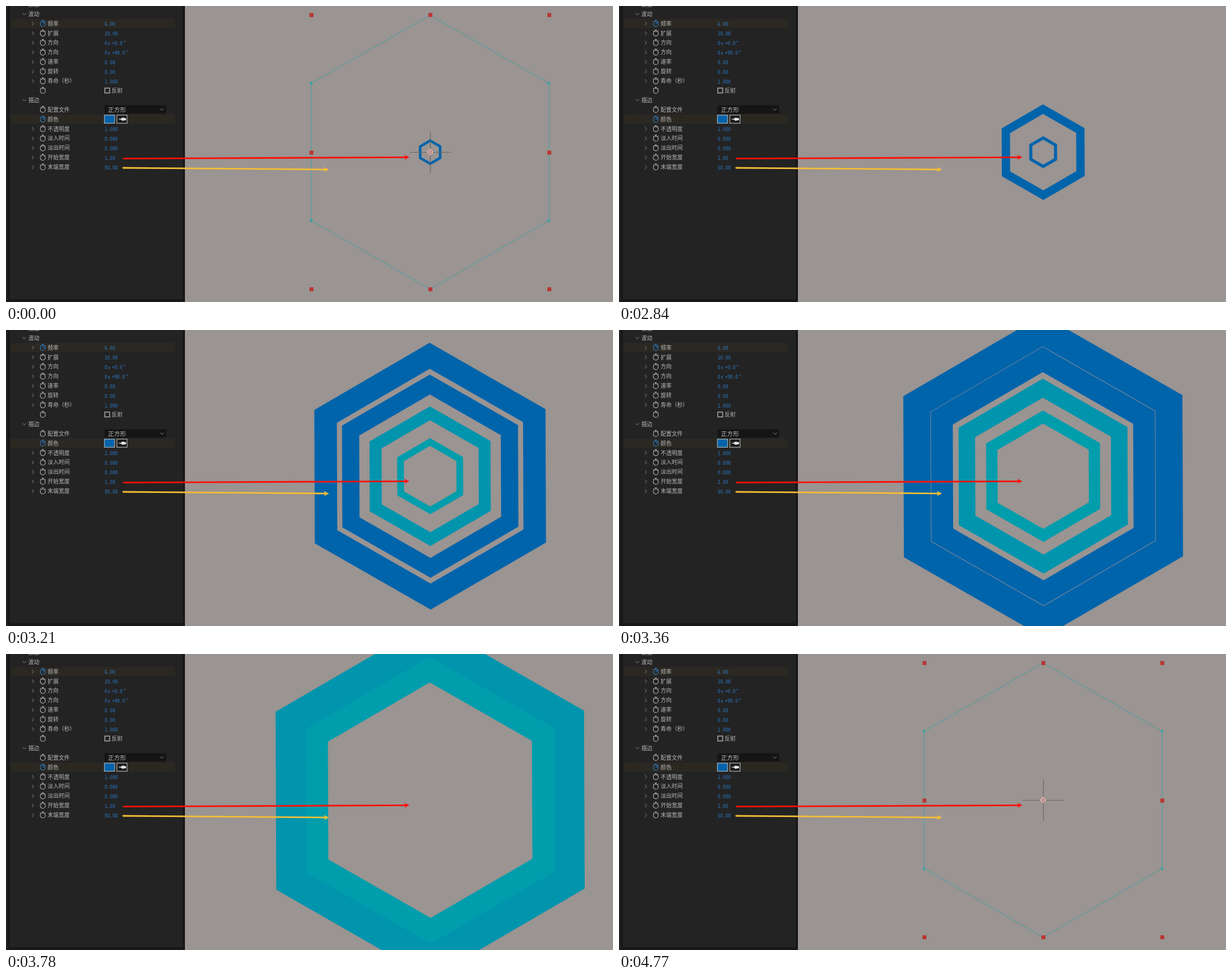
Write an HTML page that moves like this. It is 1072 by 523 pixels and loops after 5510 ms.

```html
<!DOCTYPE html>
<html lang="zh-CN">
<head>
<meta charset="utf-8">
<title>波动描边宽度</title>
<style>
  html, body { margin: 0; width: 100%; height: 100%; overflow: hidden; background: #9a9492; }
  svg { display: block; width: 1072px; height: 523px; }
  text { font-family: "Noto Sans CJK SC", "Noto Sans CJK", sans-serif; font-size: 9.7px; fill: #b9b9b9; }
  .val { font-family: "Noto Sans Mono CJK SC", "Liberation Mono", monospace; font-size: 9.3px; fill: #2c79c4; }
  .small { font-size: 8px; }
  .menu { font-size: 10.7px; }
  .line { fill: none; stroke: #b4b4b4; stroke-width: 1.1; }
  .arrow { fill: none; stroke: #8c8c8c; stroke-width: 1; }
  .keyed { stroke: #2c7fd0; }
</style>
</head>
<body>
<svg viewBox="0 0 1072 523">
  <defs>
    <g id="watch">
      <circle cy=".8" r="4.5"/>
      <path d="M-1.8-5.6H1.8M0-5.6V-3.7M-4.6-4.1l1.3 1.2M4.6-4.1l-1.3 1.2"/>
    </g>
    <path id="closed" class="arrow" d="M-1.5-3.2L1.7 0L-1.5 3.2"/>
    <path id="open" class="arrow" d="M-3.2-1.5L0 1.7L3.2-1.5"/>
  </defs>

  <rect width="1072" height="523" fill="#9a9492"/>
  <g id="waves" fill-rule="evenodd"></g>

  <g id="overlay">
    <path d="M749 16L959 136.5V379L749 500.5L539 379V136.5Z" fill="none" stroke="#3ea1a2"/>
    <g id="handles"></g>
    <path d="M713 258.5H744M754 258.5H786M749.5 222V253M749.5 263V295" stroke="#6c6664" stroke-width="1.2"/>
    <circle cx="748.8" cy="258" r="4.3" fill="none" stroke="#e3c4c2" stroke-width="1.6"/>
    <path d="M744.3 253.5l9 9M753.3 253.5l-9 9" stroke="#c2524f"/>
    <circle cx="748.8" cy="258" r="2" fill="#d9a5a2"/>
  </g>

  <rect width="316" height="523" fill="#181818"/>
  <rect width="3" height="523" fill="#212121"/>
  <rect x="7" width="305" height="518" fill="#232323"/>
  <rect x="8" y="23" width="290" height="16" fill="#2b2822"/>
  <rect x="8" y="192" width="290" height="16" fill="#2b2822"/>
  <g id="rows"></g>

  <rect x="174.5" y="145" width="8.6" height="8.6" class="line" style="stroke-width:1.4"/>
  <text x="186.6" y="153">反射</text>

  <rect x="174" y="175.5" width="109" height="14.5" fill="#151515"/>
  <text class="menu" x="180" y="187">正方形</text>
  <use href="#open" x="275.5" y="182.8"/>

  <rect x="173.8" y="192.8" width="18" height="14.4" fill="#0063ab" stroke="#b0b0b0" stroke-width="1.2"/>
  <rect x="195.8" y="192.8" width="18" height="14.4" fill="#1b1b1b" stroke="#b0b0b0" stroke-width="1.2"/>
  <path d="M197.5 200L205 198.6V201.4Z" fill="#cfcfcf"/>
  <path d="M204 197.6h4l4 1v2.8l-4 1h-4z" fill="#e6e6e6"/>

  <path d="M208 269.5L706 267.4" stroke="#fb1109" stroke-width="2.8" stroke-linecap="round"/>
  <path d="M712.5 267.3L703.5 263L705.5 267.4L703.5 271.6Z" fill="#fb1109"/>
  <path d="M207 286L564 288.9" stroke="#f6be35" stroke-width="2.8" stroke-linecap="round"/>
  <path d="M570.5 288.9L561.5 284.6L563.5 288.9L561.5 293.2Z" fill="#f6be35"/>
</svg>

<script>
const LOOP = 5510;
const byId = id => document.getElementById(id);

// Panel rows: label, value, and "k" when keyed.
const ROWS = [
  ['波动'], ['频率', '6.00', 'k'], ['扩展', '10.00'], ['方向', '0x+0.0'], ['方向', '0x+90.0'],
  ['速率', '0.00'], ['旋转', '0.00'], ['寿命（秒）', '1.000'], ['', ''], ['描边'],
  ['配置文件', ''], ['颜色', '', 'k'], ['不透明度', '1.000'], ['淡入时间', '0.000'],
  ['淡出时间', '0.000'], ['开始宽度', '1.00'], ['末端宽度', '50.00']
];

function valueText(value, y) {
  const [turns, angle] = value.split('x');
  const put = (x, s, cls = '') => `<text class="val ${cls}" x="${x}" y="${y}">${s}</text>`;
  if (!angle) return put(174.2, value);
  const end = 187 + angle.length * 4.65;
  return put(174.2, turns) + put(180, 'x', 'small') + put(187, angle) +
    `<circle cx="${end + 3.5}" cy="${y - 6}" r="1" fill="none" stroke="#2c79c4" stroke-width=".7"/>`;
}

function rowMarkup([label, value, keyed], i) {
  const y = 14 + 16.9 * i;
  if (value === undefined) {
    return `<use href="#open" x="32.3" y="${y}"/><text x="39.6" y="${y + 3.7}">${label}</text>`;
  }
  const lead = value ? `<use href="#closed" x="47.3" y="${y + .3}"/>`
                     : `<circle cx="47" cy="${y}" r=".6" fill="#3c3c3c"/>`;
  const hand = keyed ? `<path class="line keyed" d="M65 ${y + 1}l2.4-2.6"/>` : '';
  return lead +
    `<use href="#watch" class="line ${keyed ? 'keyed' : ''}" x="65" y="${y}"/>` + hand +
    `<text x="73.6" y="${y + 3.7}">${label}</text>` + (value ? valueText(value, y + 4.2) : '');
}

byId('rows').innerHTML =
  '<use href="#open" x="32.3" y="-3"/><text x="39.6" y=".7">蒙版</text>' + ROWS.map(rowMarkup).join('');

const square = (x, y) => `<rect x="${x - 3.5}" y="${y - 3.5}" width="7" height="7" fill="#b93634"/>`;
const dot = (x, y) => `<circle cx="${x}" cy="${y}" r="2.5" fill="#3ea1a2"/>`;
let handles = '';
for (const x of [539.5, 749.5, 959.5])
  for (const y of [16, 259, 500.5])
    if (x !== 749.5 || y !== 259) handles += square(x, y);
for (const x of [538.8, 958.8])
  for (const y of [136.5, 379]) handles += dot(x, y);
byId('handles').innerHTML = handles;

// Waves are born 1/6 s apart and live 1 s; older ones lie on top.
const COLORS = ['#0064ab', '#0064ab', '#0094ad', '#009dac'];
const TILT = -0.22 * Math.PI / 180;
const rings = COLORS.map(fill => {
  const path = document.createElementNS('http://www.w3.org/2000/svg', 'path');
  path.setAttribute('fill', fill);
  byId('waves').prepend(path);
  return path;
});

function hexagon(r) {
  const points = [];
  for (let i = 0; i < 6; i++) {
    const a = i * Math.PI / 3 - Math.PI / 2 + TILT;
    points.push((749.1 + r * Math.cos(a)).toFixed(2) + ' ' + (258.3 + r * Math.sin(a)).toFixed(2));
  }
  return 'M' + points.join('L') + 'Z';
}

function ring(age) {
  if (age <= 0 || age >= 1) return '';
  const outer = 0.5 + 337 * age;
  const inner = Math.max(0, 0.809 * outer - 0.9);
  return hexagon(outer) + hexagon(inner);
}

// Playback: time in ms, age of the first wave in s, steps until the next entry.
const PLAY = [
  [0, 0.0667, 1], [2710, 0.15, 7], [3030, 0.4975, 4], [3210, 0.698, 2], [3310, 0.8, 5],
  [3540, 1.0155, 5], [3780, 1.265, 1], [3820, 1.31, 1], [3880, 1.367, 3], [4010, 1.5, 1]
];

function waveAge(t) {
  const i = PLAY.findLastIndex(p => p[0] <= t);
  const [t0, a0, steps] = PLAY[i];
  if (i === PLAY.length - 1) return 9;
  const [t1, a1] = PLAY[i + 1];
  return a0 + (a1 - a0) * Math.floor((t - t0) / (t1 - t0) * steps) / steps;
}

function draw(t) {
  const age = waveAge(t);
  rings.forEach((path, i) => path.setAttribute('d', ring(age - i / 6)));
  byId('overlay').style.display = t < 2570 || t >= 4770 ? '' : 'none';
}

const start = performance.now();
function tick() {
  draw((performance.now() - start) % LOOP);
  requestAnimationFrame(tick);
}
tick();
</script>
</body>
</html>
```
